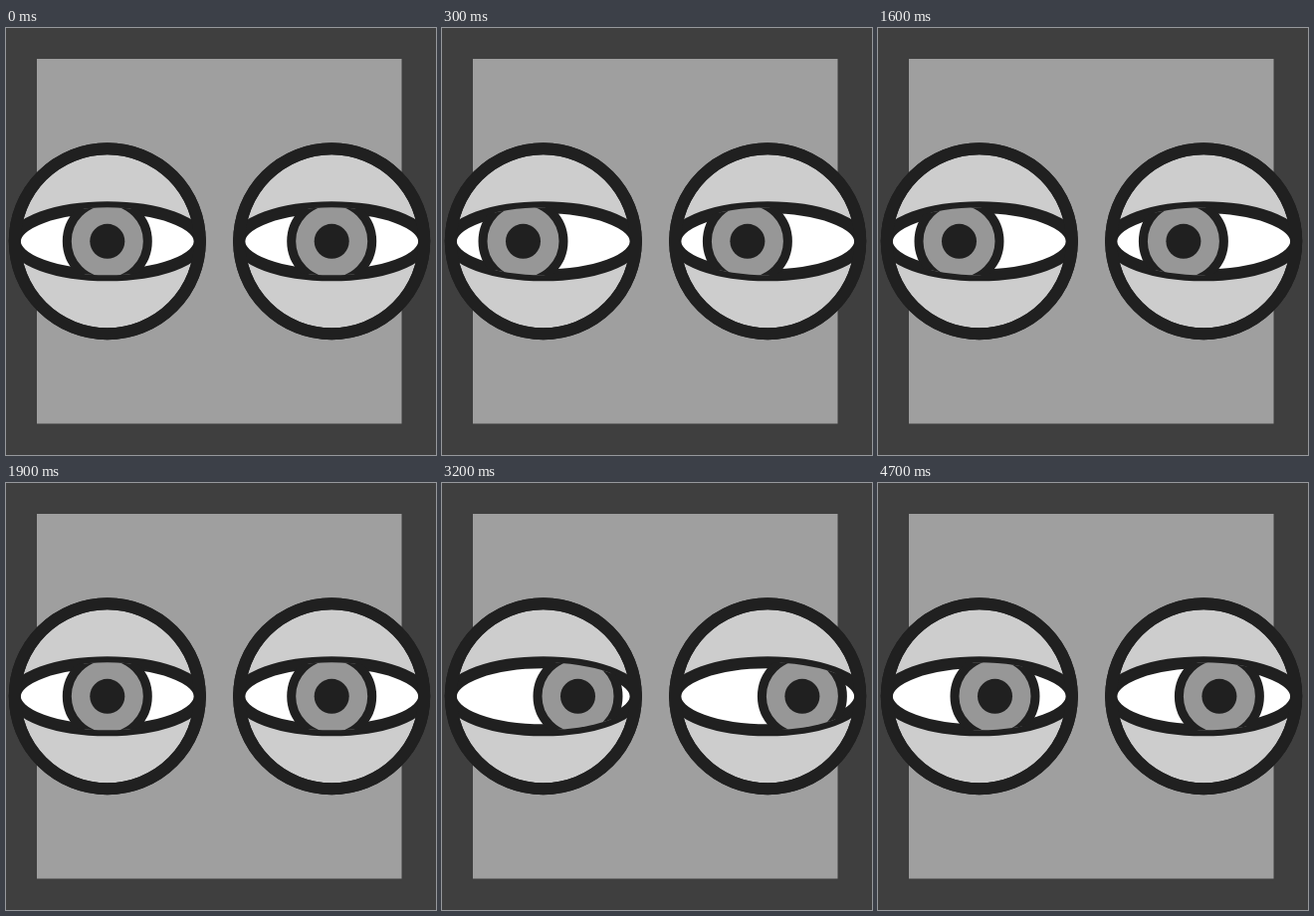
Write an HTML page that moves like this. It is 432 px wide and 429 px high and loops after 5000 ms.

```html
<!DOCTYPE html>
<html lang="en">
<head>
<meta charset="utf-8">
<title>Shifting eyes</title>
<style>
html, body { margin: 0; width: 100%; height: 100%; overflow: hidden; background: #3f3f3f; }
svg { display: block; width: 100vw; height: 100vh; }
</style>
</head>
<body>
<svg viewBox="0 0 432 429">
  <defs>
    <clipPath id="opening"><ellipse rx="93" ry="34"/></clipPath>
    <g id="eye" stroke="#202020" stroke-width="12">
      <circle r="93" fill="#cdcdcd"/>
      <ellipse rx="93" ry="34" fill="#fff"/>
      <circle r="93" fill="none"/>
      <g clip-path="url(#opening)">
        <g id="iris" stroke-width="9">
          <circle r="40.5" fill="#979797"/>
          <circle r="17.5" fill="#202020" stroke="none"/>
        </g>
      </g>
    </g>
  </defs>
  <rect width="432" height="429" fill="#3f3f3f"/>
  <rect x="31" y="31" width="366.5" height="366.5" fill="#9f9f9f"/>
  <use href="#eye" x="101.8" y="214.3"/>
  <use href="#eye" x="327.2" y="214.3"/>
</svg>
<script>
const LOOP = 5000;
// [start ms, horizontal gaze offset]
const gaze = [[0, 0], [300, -20.3], [600, -37], [1600, -20.3], [1900, 0],
              [2900, 15.7], [3200, 34.7], [4700, 15.7]];
const iris = document.getElementById('iris');

function draw() {
  const t = performance.now() % LOOP;
  const [, x] = gaze.findLast(([start]) => start <= t);
  iris.setAttribute('transform', `translate(${x})`);
  requestAnimationFrame(draw);
}
draw();
</script>
</body>
</html>
```
